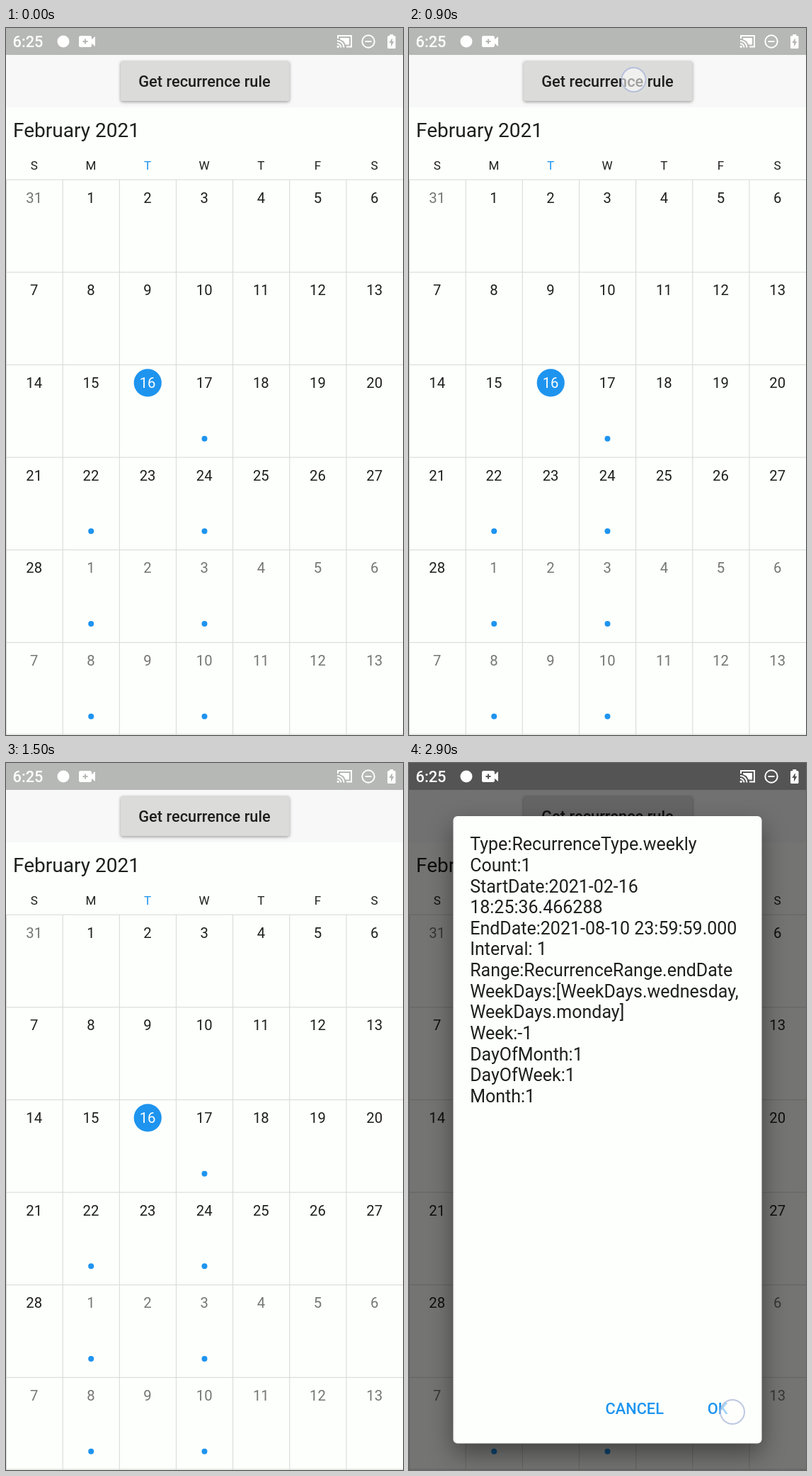
An HTML page with a canvas for the animation above (3000 ms loop, 561x998 px).

```html
<!DOCTYPE html>
<html lang="en">
<head>
<meta charset="utf-8">
<title>Recurrence rule</title>
<style>
html, body { margin: 0; width: 100%; height: 100%; overflow: hidden; background: #fdfffc; }
canvas { display: block; width: 561px; height: 998px; }
</style>
</head>
<body>
<canvas id="stage" width="561" height="998"></canvas>
<script>
const W = 561, H = 998, LOOP = 3000;
const ctx = document.getElementById('stage').getContext('2d');
const COL = W / 7, ROW = 130.65, TOP = 214;
const PAPER = '#fdfffc', INK = '#1e1f1e', GREY = '#757675', BLUE = '#1e94ef';
const RULE = [
  'Type:RecurrenceType.weekly', 'Count:1', 'StartDate:2021-02-16', '18:25:36.466288',
  'EndDate:2021-08-10 23:59:59.000', 'Interval: 1', 'Range:RecurrenceRange.endDate',
  'WeekDays:[WeekDays.wednesday,', 'WeekDays.monday]', 'Week:-1',
  'DayOfMonth:1', 'DayOfWeek:1', 'Month:1'
];

function text(str, x, y, size, color = INK, align = 'center', weight = 400) {
  ctx.font = `${weight} ${size}px Roboto, sans-serif`;
  ctx.textAlign = align;
  ctx.fillStyle = color;
  ctx.fillText(str, x, y);
}

function rect(x, y, w, h, color) {
  ctx.fillStyle = color;
  ctx.fillRect(x, y, w, h);
}

function disc(x, y, r, color) {
  ctx.fillStyle = color;
  ctx.beginPath();
  ctx.arc(x, y, r, 0, 2 * Math.PI);
  ctx.fill();
}

function box(x, y, w, h, r, color) {
  ctx.fillStyle = color;
  ctx.beginPath();
  ctx.roundRect(x, y, w, h, r);
  ctx.fill();
}

function poly(points, color) {
  ctx.fillStyle = color;
  ctx.beginPath();
  points.forEach(([x, y]) => ctx.lineTo(x, y));
  ctx.fill();
}

// Raised surface: a rounded box with a drop shadow
function card(x, y, w, h, r, color, blur, drop, alpha) {
  ctx.save();
  ctx.shadowColor = `rgba(0,0,0,${alpha})`;
  ctx.shadowBlur = blur;
  ctx.shadowOffsetY = drop;
  box(x, y, w, h, r, color);
  ctx.restore();
}

function drawHeader() {
  rect(0, 0, W, 38, '#b6b8b5');
  rect(0, 38, W, 74, '#f7f8f7');
  card(162, 46.5, 238.5, 56.5, 3, '#dbdcda', 4, 1.5, 0.38);
  text('Get recurrence rule', 280.5, 82.8, 21.8, INK, 'center', 500);
  text('February 2021', 10, 154, 28.05, INK, 'left');
}

function drawCalendar() {
  [...'SMTWTFS'].forEach((day, i) =>
    text(day, COL * (i + 0.5) - 0.3, 199.5, 17.1, i === 2 ? BLUE : INK));

  for (let r = 0; r <= 6; r++) rect(0, Math.min(TOP + r * ROW - 0.4, H - 1.6), W, 1.1, '#d9dbd8');
  for (let c = 0; c < 7; c++) rect(c * COL - (c ? 0.5 : 0), TOP, 1.1, H - TOP, '#d9dbd8');

  const first = new Date(2021, 0, 31);
  for (let i = 0; i < 42; i++) {
    const c = i % 7, r = Math.floor(i / 7);
    const x = COL * (c + 0.5) - 0.3, y = TOP + r * ROW;
    const date = new Date(first.getFullYear(), first.getMonth(), first.getDate() + i);
    const today = i === 16;
    if (today) disc(x + 0.2, y + 25.5, 19.6, BLUE);
    const color = today ? '#fff' : date.getMonth() === 1 ? INK : GREY;
    text(date.getDate(), x, y + 32.8, 20.3, color);
    if (i > 16 && (c === 1 || c === 3)) disc(x + 0.3, y + 104.4, 4, BLUE);
  }
}

function drawDialog() {
  rect(0, 0, W, H, 'rgba(0,0,0,0.54)');
  card(62.5, 75, 436, 885.5, 6, PAPER, 34, 14, 0.42);
  RULE.forEach((line, i) => text(line, 86.2, 123.3 + i * 29.63, 25, INK, 'left'));
  text('CANCEL', 318.7, 918.7, 21.8, BLUE, 'center', 500);
  text('OK', 436.2, 918.7, 21.8, BLUE, 'center', 500);
}

function drawStatus(bar) {
  const white = '#fff';
  text('6:25', 9.5, 26.8, 21.8, white, 'left', 500);
  disc(81, 19, 8.5, white);

  // Video camera
  box(103, 11, 18, 16, 2.5, white);
  poly([[120, 17], [126, 12], [126, 26], [120, 21]], white);
  rect(111, 15.5, 2, 7, bar);
  rect(108.5, 18, 7, 2, bar);

  // Cast
  ctx.strokeStyle = white;
  ctx.lineWidth = 2;
  ctx.beginPath();
  ctx.moveTo(469, 15);
  ctx.lineTo(469, 11);
  ctx.lineTo(488, 11);
  ctx.lineTo(488, 26.5);
  ctx.lineTo(481, 26.5);
  ctx.stroke();
  poly([[472, 14], [485, 14], [485, 23.5], [480, 23.5], [477, 18.5], [472, 16]], white);
  for (const r of [5.5, 9.5]) {
    ctx.beginPath();
    ctx.arc(468, 27.5, r, -Math.PI / 2, 0);
    ctx.stroke();
  }
  disc(469.2, 26.3, 1.6, white);

  // Do not disturb
  ctx.beginPath();
  ctx.arc(512, 19, 8.7, 0, 2 * Math.PI);
  ctx.stroke();
  rect(507.5, 18, 9, 2, white);

  // Battery
  box(539, 11, 11.5, 18, 1.5, white);
  rect(542.3, 9, 5, 3, white);
  poly([[545.8, 14], [541.3, 21], [544, 21], [544, 26.5], [548.3, 19], [545.8, 19]], bar);
}

function drawTouch(x, y, alpha) {
  ctx.save();
  ctx.globalAlpha = alpha;
  disc(x, y, 17.5, 'rgba(255,255,255,0.58)');
  ctx.strokeStyle = 'rgba(150,166,208,0.62)';
  ctx.lineWidth = 2;
  ctx.beginPath();
  ctx.arc(x, y, 17, 0, 2 * Math.PI);
  ctx.stroke();
  ctx.restore();
}

function draw(ms) {
  const t = Math.floor(ms / 100) * 100;
  const open = t >= 1600;
  rect(0, 0, W, H, PAPER);
  drawHeader();
  drawCalendar();
  if (open) drawDialog();
  drawStatus(open ? '#535553' : '#b6b8b5');
  if (t >= 900 && t < 1200) drawTouch(317.5, 73, Math.min(1, (1200 - t) / 200));
  if (t >= 2800) drawTouch(457, 916, 1);
}

const start = performance.now();
function tick() {
  draw((performance.now() - start) % LOOP);
  requestAnimationFrame(tick);
}
tick();
</script>
</body>
</html>
```
